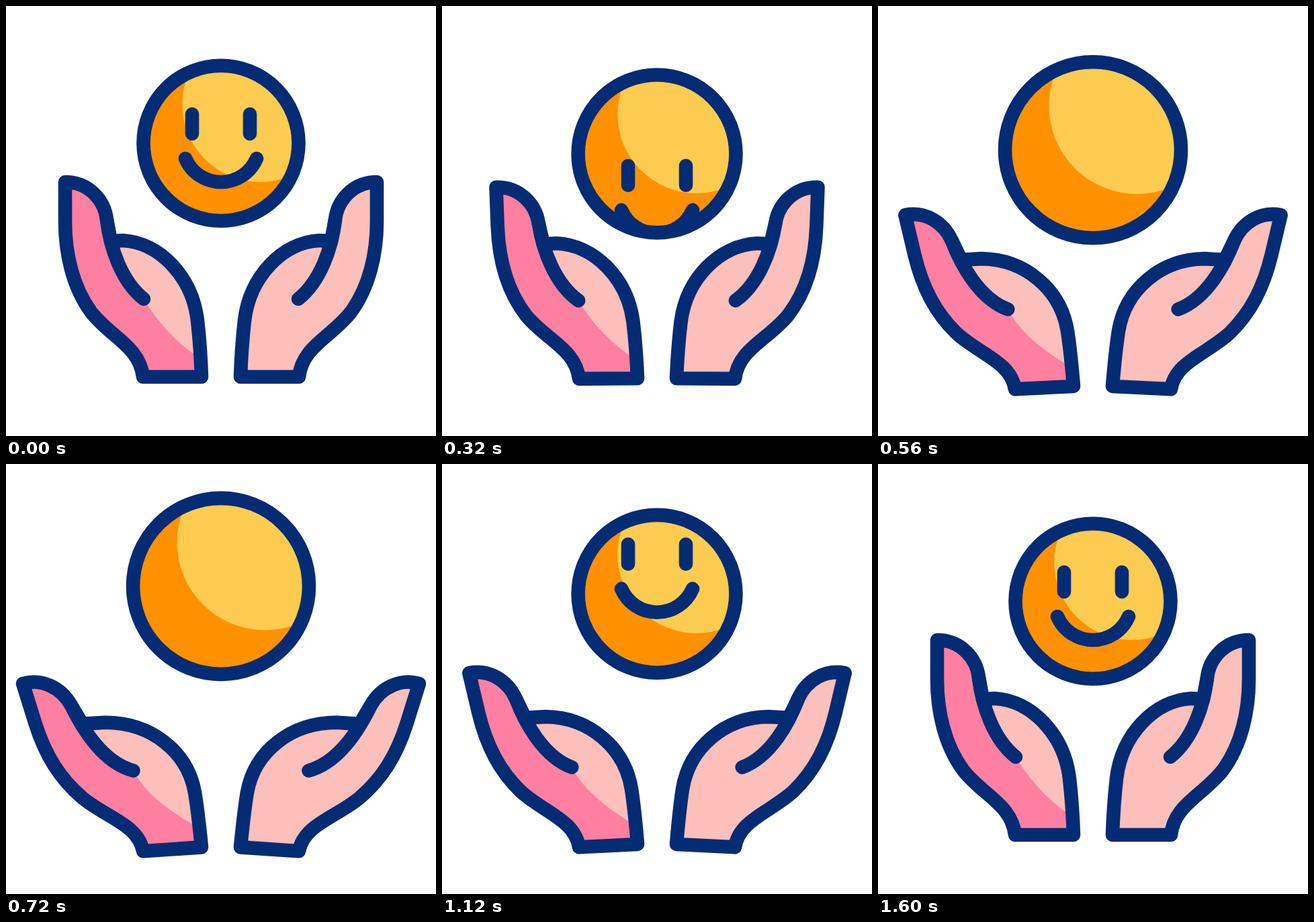
Write an HTML page that moves like this. It is 640 px wide and 640 px high and loops after 1.72 s.

```html
<!DOCTYPE html>
<html lang="en">
<head>
<meta charset="utf-8">
<title>Hands and smile</title>
<style>
  html, body { margin: 0; width: 100%; height: 100%; overflow: hidden; background: #fff; }
  svg { display: block; width: 100vw; height: 100vh; }
  .line { fill: none; stroke: #042c74; stroke-width: 20.6; stroke-linecap: round; stroke-linejoin: round; }
</style>
</head>
<body>
<svg viewBox="0 0 640 640">
  <defs>
    <clipPath id="disc"><circle class="ball" cx="320"/></clipPath>
    <g id="face" class="line">
      <path d="M277 161V190M363 161V190M267 227A57.6 57.6 0 0 0 373 227"/>
    </g>
  </defs>
  <g clip-path="url(#disc)">
    <rect width="640" height="640" fill="#ff9100"/>
    <circle id="light" fill="#fdcb50"/>
    <use id="leaving" href="#face"/>
    <use id="coming" href="#face"/>
  </g>
  <circle class="ball line" cx="320"/>
  <g>
    <path class="outline" fill="#ff7fa1"/>
    <path id="palm" fill="#fdbfba"/>
    <path class="outline line"/>
    <path class="thumb line"/>
  </g>
  <g transform="matrix(-1 0 0 1 640 0)">
    <path class="outline" fill="#fdbfba"/>
    <path class="outline line"/>
    <path class="thumb line"/>
  </g>
</svg>
<script>
const LOOP = 1720, STEP = 40, END = 1600;

// Each shape: closed pose, open pose
const ARCH = [
  'L285 468C277 402 228 352 174 349L156 350',
  'L281 490C270 428 215 386 147 386L112 388'
];
const THUMB = [
  'M150 318C155 360 172 410 205 436',
  'M95 360C112 394 143 445 189 457'
];
const OUTLINE = [
  'M88 262L88 320C88 368 99 418 127 456C157 494 199 507 204 552L291 552C290 522 288 495 285 468'
    + ARCH[0] + 'L150 318C147 290 124 262 88 262Z',
  'M23 329L42 388C58 437 80 470 113 498C150 528 197 538 204 577L291 571C288 541 285 514 281 490'
    + ARCH[1] + 'L95 360C79 333 50 321 23 329Z'
];
const PALM = [
  THUMB[0] + 'C224 468 254 502 287 523' + ARCH[0] + 'Z',
  THUMB[1] + 'C207 492 242 517 287 542' + ARCH[1] + 'Z'
];

const all = s => document.querySelectorAll(s);
const set = (s, attrs) => all(s).forEach(el => {
  for (const k in attrs) el.setAttribute(k, attrs[k]);
});

function ease(t, from, to, n = 2.5) {
  const u = Math.min(1, Math.max(0, (t - from) / (to - from)));
  return u < .5 ? (2 * u) ** n / 2 : 1 - (2 - 2 * u) ** n / 2;
}

function morph([a, b], p) {
  const end = b.match(/\d+/g);
  let i = 0;
  return a.replace(/\d+/g, v => (+v + (end[i++] - v) * p).toFixed(2) + ' ');
}

function draw(t) {
  const open = ease(t, 120, 840) - ease(t, 840, 1560);
  set('.outline', { d: morph(OUTLINE, open) });
  set('.thumb', { d: morph(THUMB, open) });
  set('#palm', { d: morph(PALM, open) });

  const cy = 204.2 + 19.2 * ease(t, 40, 440, 2)
    - 50.7 * ease(t, 440, 840, 2) + 31.5 * ease(t, 840, 1320, 2);
  const r = 115.5 + 15.5 * (ease(t, 240, 520) - ease(t, 920, 1200));
  set('.ball', { cy, r });
  set('#light', { cx: 320 + r / 2, cy: cy - r / 2, r });

  // One face rolls off the bottom while the next rolls in from the top
  set('#leaving', {
    y: 228 * ease(t, 0, 750),
    visibility: t < 760 ? 'visible' : 'hidden'
  });
  set('#coming', { y: 228 * (ease(t, 560, 1400) - 1) });
}

const start = performance.now();
function tick() {
  const t = (performance.now() - start) % LOOP;
  draw(Math.min(END, Math.floor(t / STEP) * STEP));
  requestAnimationFrame(tick);
}
tick();
</script>
</body>
</html>
```
